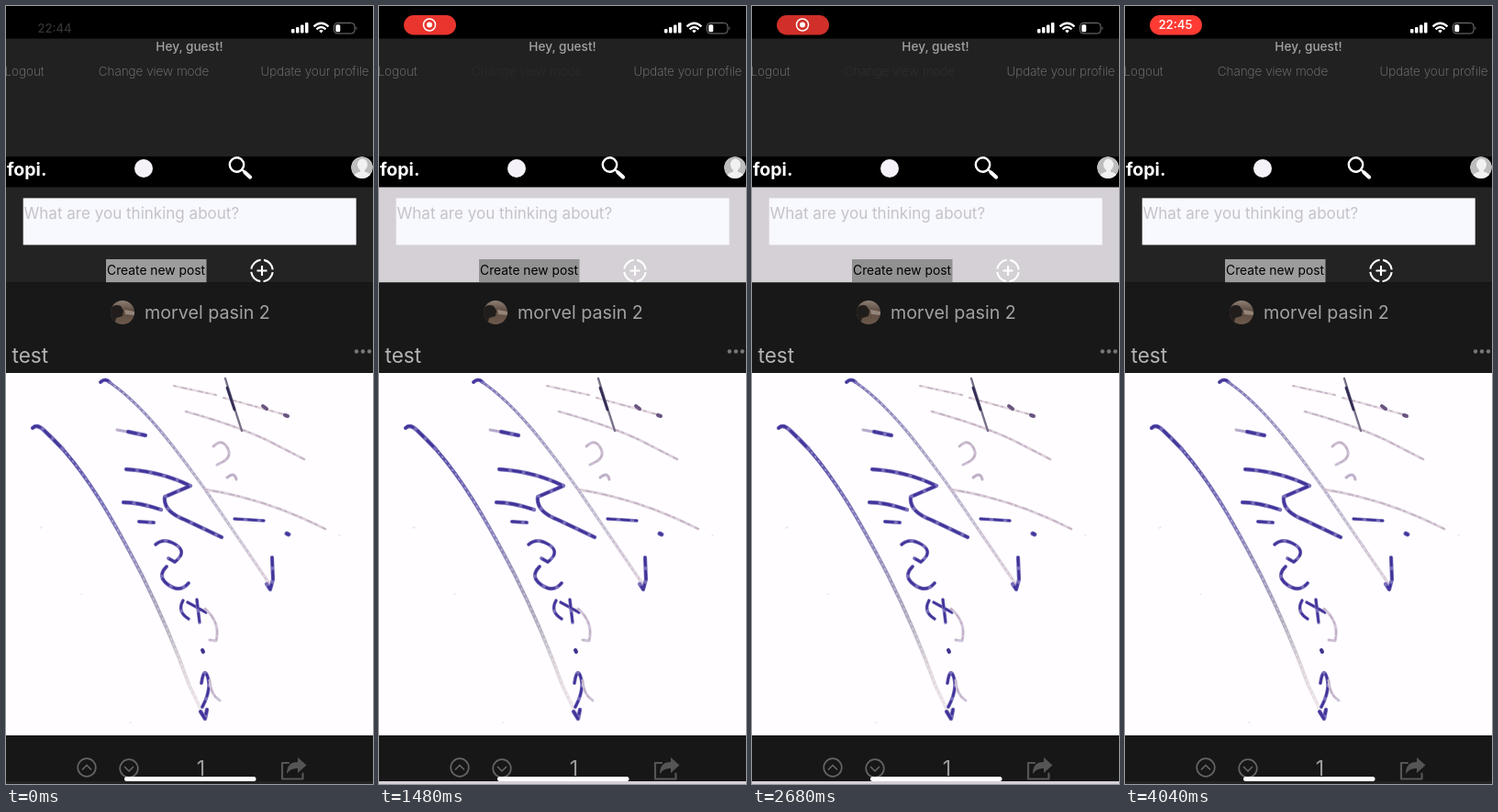
An HTML page for the animation above (4120 ms loop, 400 px wide and 848 px high).

```html
<!DOCTYPE html>
<html lang="en">
<head>
<meta charset="utf-8">
<title>Feed</title>
<style>
  html, body { margin: 0; width: 100%; height: 100%; overflow: hidden; background: #000; }
  svg { display: block; width: 100vw; height: 100vh; }
  text { font-family: Inter, Roboto, sans-serif; white-space: pre; }
  .ink, .line { fill: none; stroke-linecap: round; stroke-linejoin: round; }
  .link { font-size: 13.5px; font-weight: 200; fill: #808080; }
</style>
</head>
<body>
<svg viewBox="0 0 400 848" preserveAspectRatio="none">
  <defs>
    <linearGradient id="long" gradientUnits="userSpaceOnUse" x1="30" y1="457" x2="214" y2="770">
      <stop offset="0" stop-color="#463aa0"/>
      <stop offset=".35" stop-color="#8079ba"/>
      <stop offset=".7" stop-color="#b0aabd"/>
      <stop offset=".85" stop-color="#dcd3da"/>
      <stop offset="1" stop-color="#efe6ec"/>
    </linearGradient>
    <linearGradient id="mid" gradientUnits="userSpaceOnUse" x1="104" y1="408" x2="288" y2="632">
      <stop offset="0" stop-color="#7a72b6"/>
      <stop offset=".4" stop-color="#aca6c6"/>
      <stop offset="1" stop-color="#dccfda"/>
    </linearGradient>
    <linearGradient id="photo" x1="0" y1="0" x2="0" y2="1">
      <stop offset="0" stop-color="#8d7f74"/>
      <stop offset=".45" stop-color="#5c4a40"/>
      <stop offset="1" stop-color="#6d5a4c"/>
    </linearGradient>
    <clipPath id="face"><circle cx="388" cy="176" r="12"/></clipPath>
    <clipPath id="round"><circle cx="127" cy="334" r="13"/></clipPath>
  </defs>

  <rect width="400" height="848"/>

  <!-- status bar -->
  <text id="oldTime" x="53" y="29" font-size="13" font-weight="500" fill="#fff" text-anchor="middle">22:44</text>
  <rect id="pill" x="27" y="10" width="57" height="21.500" rx="10.750" fill="#ff3b33"/>
  <g id="rec" fill="none" stroke="#fff" stroke-width="1.500">
    <circle cx="55" cy="20.500" r="6.500"/><circle cx="55" cy="20.500" r="3" fill="#fff" stroke="none"/>
  </g>
  <text id="newTime" x="55" y="25.300" font-size="13.300" font-weight="500" fill="#fff" text-anchor="middle">22:45</text>
  <g fill="#fff">
    <rect x="311" y="25" width="3.500" height="4.500" rx="1"/>
    <rect x="316" y="23" width="3.500" height="6.500" rx="1"/>
    <rect x="321" y="20.500" width="3.500" height="9" rx="1"/>
    <rect x="326" y="18" width="3.500" height="11.500" rx="1"/>
  </g>
  <g class="line" stroke="#fff" stroke-width="2.300" style="stroke-linecap:butt">
    <path d="M335.500 22.300Q343.500 15.200 351.500 22.300M338.500 25.300Q343.500 20.800 348.500 25.300"/>
    <path d="M343.500 29.500l-2.300-2.500q2.300-1.800 4.600 0z" fill="#fff" stroke="none"/>
  </g>
  <rect x="357.500" y="18.500" width="22.500" height="11.500" rx="3.500" fill="none" stroke="#777"/>
  <rect x="359.300" y="20.200" width="5" height="8" rx="1.500" fill="#fff"/>
  <path d="M381.500 22.300q2 2 0 4z" fill="#777"/>

  <!-- profile links -->
  <rect y="35.500" width="400" height="128.500" fill="#212121"/>
  <text x="200" y="49" font-size="13.600" font-weight="500" fill="#a3a3a3" text-anchor="middle">Hey, guest!</text>
  <text class="link" x="-1.500" y="76">Logout</text>
  <text class="link" id="mode" x="161" y="76" text-anchor="middle">Change view mode</text>
  <text class="link" x="277.500" y="76">Update your profile</text>

  <!-- navigation -->
  <text x="1" y="184.500" font-size="19.500" font-weight="700" fill="#fff">fopi.</text>
  <circle cx="150" cy="177" r="10" fill="#f4f2f8"/>
  <g class="line" stroke="#fff">
    <circle cx="251.500" cy="173" r="7.700" stroke-width="2.400"/>
    <path d="M257.500 178.500l3 3" stroke-width="2.400"/><path d="M260.500 181.500l5.500 5" stroke-width="4.200"/>
  </g>
  <g clip-path="url(#face)">
    <circle cx="388" cy="176" r="12" fill="#bdbdbd"/>
    <g fill="#f1f1f1"><ellipse cx="388.500" cy="173" rx="5.500" ry="6.500"/><ellipse cx="388.500" cy="188" rx="10.500" ry="7.500"/><rect x="386" y="177" width="5" height="6"/></g>
  </g>

  <!-- new post form -->
  <rect class="theme" y="197.500" width="400" height="104"/>
  <rect x="18.700" y="209.400" width="363" height="51" fill="#f8f8ff"/>
  <text x="19.500" y="232" font-size="17.050" fill="#c3c3c9">What are you thinking about?</text>
  <rect id="button" x="109" y="276" width="109.500" height="25.300"/>
  <text x="163.500" y="293.300" font-size="13.800" text-anchor="middle">Create new post</text>
  <g fill="none" stroke="#fff" stroke-width="2.100">
    <circle cx="279" cy="288.500" r="11.800" stroke-dasharray="15.035 3.500" stroke-dashoffset="-1.750"/>
    <path d="M273.500 288.500h11M279 283v11"/>
  </g>

  <!-- post -->
  <rect y="301.500" width="400" height="98.500" fill="#181818"/>
  <g clip-path="url(#round)">
    <rect x="114" y="321" width="26" height="26" fill="url(#photo)"/>
    <path d="M114 329q5-5 11-2l3 5-1 6-7 2-2 8h-4z" fill="#211d1c"/>
    <path d="M129 331l11 2v4l-10-1z" fill="#94857a"/>
  </g>
  <text x="151" y="341" font-size="19.700" fill="#a2a2a2">morvel pasin 2</text>
  <text x="6.500" y="389" font-size="22.500" fill="#b4b4b4">test</text>
  <g fill="#777"><circle cx="382" cy="376.500" r="2.200"/><circle cx="389" cy="376.500" r="2.200"/><circle cx="396" cy="376.500" r="2.200"/></g>
  <rect y="400" width="400" height="395" fill="#fffdff"/>
  <g id="drawing"></g>

  <!-- post actions -->
  <rect y="795" width="400" height="50" fill="#171717"/>
  <rect class="theme" y="845" width="400" height="3"/>
  <g class="line" stroke="#646464" stroke-width="1.700">
    <circle cx="88" cy="830" r="9.800"/><path d="M83.500 832l4.500-4.500 4.500 4.500"/>
    <circle cx="134" cy="831" r="9.800"/><path d="M129.500 829.500l4.500 4.500 4.500-4.500"/>
  </g>
  <text x="212.500" y="839" font-size="23" fill="#9b9b9b" text-anchor="middle">1</text>
  <path class="line" d="M308 825h-7v17.500h22.500v-6" stroke="#555" stroke-width="2.200"/>
  <path d="M306 837q0-13 12-13v-5l9.500 8.500-9.500 8.500v-5q-8-.5-12 6z" fill="#555"/>
  <rect x="129" y="840" width="143.500" height="5" rx="2.500" fill="#fff"/>
</svg>
<script>
const LOOP = 4120;
const TAPS = [640, 1540, 2640, 3560];
const NS = "http://www.w3.org/2000/svg";
const $ = id => document.getElementById(id);
const ramp = (t, a, b) => Math.min(1, Math.max(0, (t - a) / (b - a)));
const ease = x => x < .5 ? 2 * x * x : 1 - 2 * (1 - x) * (1 - x);

function ink(d, color, width, dash) {
  const p = document.createElementNS(NS, "path");
  const attrs = { class: "ink", d, stroke: color, "stroke-width": width };
  if (dash) attrs["stroke-dasharray"] = dash;
  for (const k in attrs) p.setAttribute(k, attrs[k]);
  $("drawing").append(p);
}

function pen(d, width = 4) {
  ink(d, "#7a70bb", width);
  ink(d, "#41349a", width * .65, "9 6");
}

function faint(d, color = "#e6dbe4", width = 2.6) {
  ink(d, color, width);
  ink(d, "#c3b1c3", width * .6, "2 7 5 4");
}

function drawScribble() {
  const sweep = "M29 460Q34 455 42 463C86 502 122 570 148 620Q178 680 200 741L214 770";
  const slash = "M103 410Q108 405 114 411C150 436 184 481 217 527L288 631";
  ink(sweep, "url(#long)", 3.8);
  ink(sweep, "#ffffff66", 1.6, "1 5");
  pen("M29 460Q34 455 42 463L62 483", 4.4);
  ink(slash, "url(#mid)", 3.2);
  ink(slash, "#ffffff77", 1.5, "1 5");
  pen("M103 410Q108 405 113 410", 4);

  faint("M183 414L229 424M237 427L306 446");
  faint("M196 442Q250 457 284 473L325 494", "#ddd0dc", 2.8);
  faint("M217 527Q283 537 348 570", "#ddd0dc", 2.8);
  ink("M239 406L248 435L257 463", "#777088", 2.4);
  ink("M241 416L249 440", "#332d55", 2.8);
  ink("M280 436l4 3M304 446l3 1", "#6a5580", 4);
  faint("M226 480Q235 471 241 481T236 497L230 500", "#cbbdd2", 3);
  faint("M241 514Q249 507 251 516", "#bdb0cd", 3);

  faint("M121 462L132 464", "#b3a9cf", 3);
  pen("M133 464L152 468", 4.4);
  pen("M131 505Q168 507 201 523L173 535Q171 551 195 560L235 579", 4.3);
  pen("M128 541Q145 541 169 549", 4.4);
  pen("M145 562L161 563", 4.2);
  pen("M249 559L281 561", 3.5);
  pen("M306 575l2 1", 5);
  pen("M290 601L291 625L288 636L284 630", 4.2);

  pen("M163 587Q172 579 185 587T184 606L177 602", 3.8);
  pen("M175 611Q164 622 177 631T199 629", 4);
  pen("M193 648Q186 660 199 668M198 650L218 661M208 647L211 672", 3.6);
  faint("M217 657Q234 672 229 692L222 691", "#d0c4da", 3);
  ink("M214 702l1 2", "#40348e", 4);
  pen("M213 738Q216 719 220 732T214 764", 3.8);
  faint("M222 735Q223 751 233 757", "#cdc2d8", 3);
  pen("M212 769L217 777L219 767", 4.4);
  ink("M37 569l2-1M82 641h1M135 781h1M363 577h1", "#ece4ec", 1.5);
}

function linkOpacity(t) {
  let o = 1;
  for (const tap of TAPS) {
    const down = ease(ramp(t, tap - 160, tap - 70));
    const up = ease(ramp(t, tap, tap + 250));
    o -= .87 * (down - up);
  }
  return o;
}

function render(t) {
  const light = TAPS.filter(tap => t >= tap).length % 2 === 1;
  for (const r of document.querySelectorAll(".theme")) r.setAttribute("fill", light ? "#d4d0d5" : "#232323");
  $("button").setAttribute("fill", light ? "#929192" : "#9c9c9c");
  $("mode").setAttribute("opacity", linkOpacity(t));

  const shown = ramp(t, 40, 520);
  const clock = ramp(t, 3080, 3290);
  const pulse = (1 - Math.cos((t - 1920) / 2060 * 2 * Math.PI)) / 2;
  $("oldTime").setAttribute("opacity", .2 * (1 - ramp(t, 0, 160)));
  $("pill").setAttribute("opacity", shown * (1 - .22 * pulse));
  $("rec").setAttribute("opacity", shown * (1 - clock));
  $("newTime").setAttribute("opacity", clock);
}

function tick(now) {
  render(now % LOOP);
  requestAnimationFrame(tick);
}

drawScribble();
render(0);
requestAnimationFrame(tick);
</script>
</body>
</html>
```
